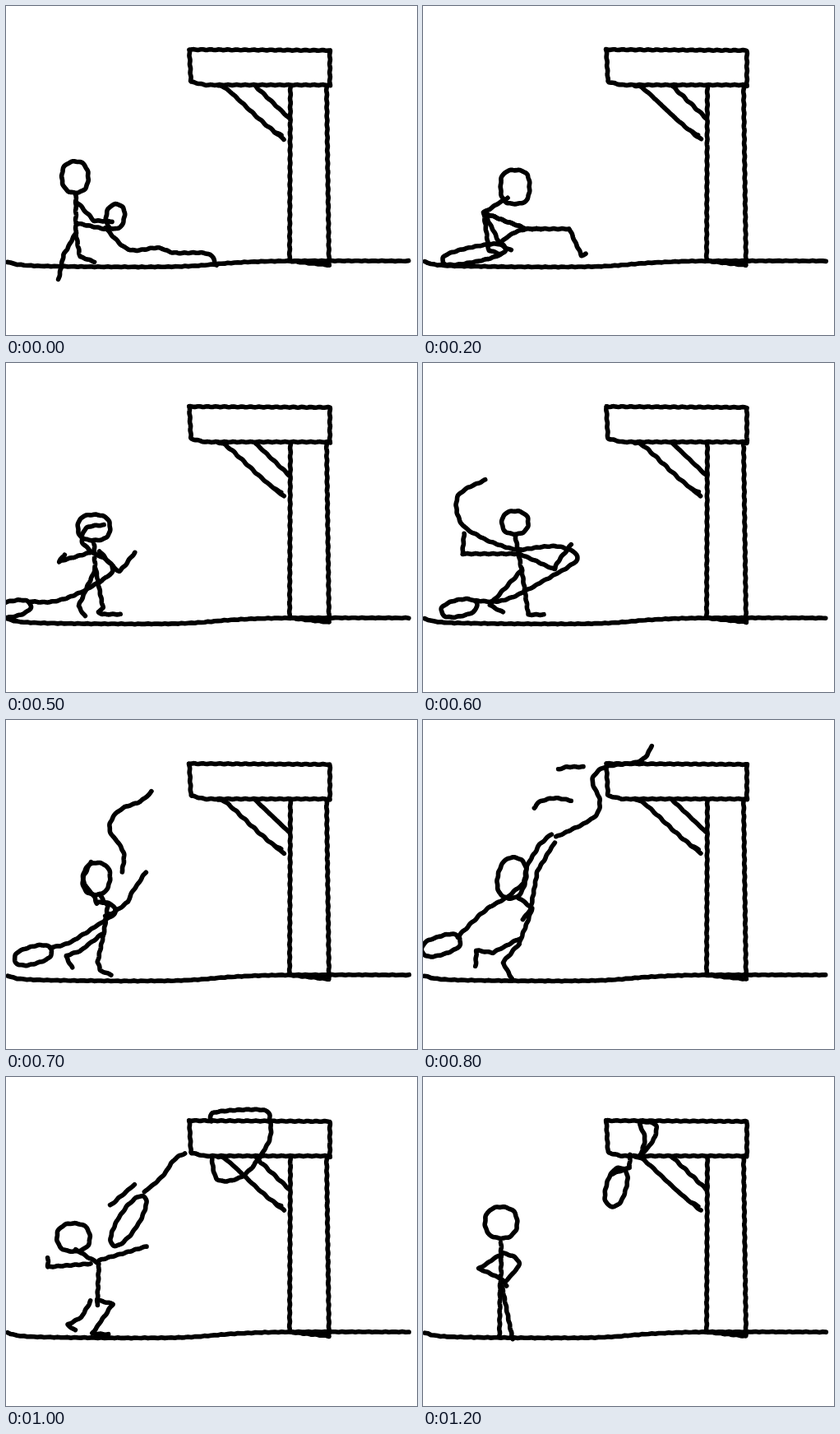
Write an HTML page with a canvas that moves like this. It is 500 px wide and 400 px high and loops after 1300 ms.

```html
<!DOCTYPE html>
<html lang="en">
<head>
<meta charset="utf-8">
<title>Stick figure and rope</title>
<style>
html, body { margin: 0; width: 100%; height: 100%; overflow: hidden; background: #fff; }
canvas { display: block; }
</style>
</head>
<body>
<canvas id="stage" width="500" height="400"></canvas>
<script>
const STEP = 100, STEPS = 13, SAMPLES = 120;
const ctx = document.getElementById('stage').getContext('2d');

const mix = (p, q, k) => p.map((v, i) => v + (q[i] - v) * k);
const dist = (p, q) => Math.hypot(q[0] - p[0], q[1] - p[1]);
const parse = s => s.split(' ').map(p => p.split(',').map(Number));

// Catmull-Rom through the given points
function smooth(pts) {
  const out = [pts[0]];
  for (let i = 0; i < pts.length - 1; i++) {
    const b = pts[i], c = pts[i + 1], a = pts[i - 1] || b, d = pts[i + 2] || c;
    for (let t = 0.125; t <= 1; t += 0.125) {
      out.push(b.map((v, j) => v + t / 2 * (c[j] - a[j]
        + t * (2 * a[j] - 5 * v + 4 * c[j] - d[j]
        + t * (3 * v - a[j] - 3 * c[j] + d[j])))));
    }
  }
  return out;
}

// Evenly spaced points, so that any two paths can be blended
function resample(pts) {
  const lens = pts.slice(1).map((p, i) => dist(pts[i], p));
  const total = lens.reduce((a, b) => a + b, 0);
  const out = [];
  let seg = 0, before = 0;
  for (let i = 0; i <= SAMPLES; i++) {
    const at = total * i / SAMPLES;
    while (seg < lens.length - 1 && before + lens[seg] < at) before += lens[seg++];
    out.push(mix(pts[seg], pts[seg + 1], Math.min(1, (at - before) / lens[seg])));
  }
  return out;
}

const line = s => resample(parse(s));
const curve = s => resample(smooth(parse(s)));

// Closed loop; a power below 1 makes it squarer than an ellipse
function ring(cx, cy, rx, ry, tilt = 0, power = 0.85) {
  const bend = v => Math.sign(v) * Math.abs(v) ** power;
  return Array.from({ length: SAMPLES + 1 }, (_, i) => {
    const a = i / SAMPLES * 2 * Math.PI;
    const x = rx * bend(Math.cos(a)), y = ry * bend(Math.sin(a));
    return [
      cx + x * Math.cos(tilt) - y * Math.sin(tilt),
      cy + x * Math.sin(tilt) + y * Math.cos(tilt)
    ];
  });
}

const scenery = [
  curve('2,311 38,316 200,317 280,312 345,310 490,310'),
  line('223,53 394,54 394,97'),
  line('223,53 225,92 242,96 394,96'),
  line('346,97 345,310 393,315'),
  line('390,97 393,315'),
  curve('258,97 270,102 310,139 338,162'),
  line('327,153 335,157'),
  line('303,97 344,136')
];

// Key poses, two steps apart; parts with the same name blend into each other.
const poses = [
  {
    head: ring(84, 208, 16, 19),
    torso: line('85,228 85,276'),
    armA: line('86,238 107,261 129,262'),
    armB: line('85,264 120,271'),
    legA: line('85,276 70,303 64,332'),
    legB: line('85,276 90,305 108,311'),
    rope: curve('256,315 245,301 205,300 184,294 149,296 122,271'),
    tail: line('122,271 121,270'),
    noose: ring(133, 256, 15, 11, -1.4)
  },
  {
    head: ring(112, 220, 17.5, 20.5, 0, 0.7),
    torso: line('103,233 74,251'),
    armA: line('75,252 126,271 145,271'),
    armB: line('75,252 126,271'),
    legA: line('74,252 80,297 95,302'),
    legB: line('76,254 94,290 107,297'),
    rope: line('198,301 193,304 178,271 130,271'),
    tail: curve('126,271 110,276 95,287'),
    noose: ring(62, 302, 39, 9, -0.2, 0.75)
  },
  {
    head: ring(102, 206, 23, 17, 0, 0.7),
    torso: line('102,223 97,255'),
    armA: line('97,226 77,249 92,259'),
    armB: curve('108,224 109,242 118,257 134,239'),
    legA: line('96,252 95,312'),
    legB: line('98,250 110,304 98,305 131,305'),
    rope: curve('163,252 150,239 120,237 105,241'),
    tail: curve('105,241 84,259 42,289 -5,291'),
    noose: ring(-30, 300, 25, 9, -0.2)
  },
  {
    head: ring(112, 194, 16, 14),
    torso: line('112,209 120,252'),
    armA: line('117,232 48,232 50,207'),
    armB: line('120,233 160,251 163,243 180,221'),
    legA: line('120,252 81,294 97,303'),
    legB: line('120,250 128,306 147,306'),
    rope: curve('76,142 43,161 46,194 75,214 105,225 120,227'),
    tail: curve('120,227 165,223 188,238 150,263 100,288 65,289'),
    noose: ring(44, 298, 22, 10, -0.2)
  },
  {
    head: ring(108, 192, 17, 25, 0.2),
    torso: line('115,215 133,229 117,272'),
    armA: line('104,214 123,198 126,178 142,151 156,139'),
    armB: line('121,243 131,230 139,184 160,149'),
    legA: line('117,266 85,283 65,280 64,299'),
    legB: line('117,272 97,295 108,314'),
    rope: curve('278,32 264,50 222,57 206,73 215,98 207,119 162,142'),
    tail: curve('102,216 75,232 42,264'),
    noose: ring(22, 274, 24, 11, -0.3, 0.75),
    streakA: curve('135,107 143,99 160,95 180,98'),
    streakB: line('165,60 175,57 195,57')
  },
  {
    head: ring(82, 195, 20, 17),
    torso: line('85,210 113,227 111,277'),
    armA: line('103,227 51,231 51,220'),
    armB: line('113,223 171,206'),
    legA: line('103,272 92,292 75,301 84,308'),
    legB: line('111,271 130,276 105,312 125,313'),
    rope: curve('250,54 254,43 312,40 321,52 319,80 290,119 258,125 250,97'),
    tail: curve('218,93 205,100 190,121 168,140'),
    noose: ring(149, 175, 35, 12, -1, 0.95),
    streakA: line('127,156 156,131')
  },
  {
    head: ring(95, 177, 19.5, 19),
    torso: line('95,201 95,250'),
    armA: line('97,214 68,233 95,245 102,254'),
    armB: curve('97,214 113,220 116,230 100,249'),
    legA: line('94,248 93,315'),
    legB: line('96,254 109,319'),
    rope: curve('264,97 270,75 264,56 283,58 280,77 264,96'),
    tail: line('252,94 251,110 230,118'),
    noose: ring(235, 134, 24, 12, -1.3)
  }
];

function figure(step) {
  const a = poses[Math.floor(step / 2)], b = poses[Math.ceil(step / 2)];
  return Object.keys(a).filter(name => b[name]).map(name =>
    a[name].map((p, i) => mix(p, b[name][i], step % 2 / 2)));
}

// Slightly uneven, hand-drawn line that differs at each step
const wobble = ([x, y], step) => [
  x + 0.4 * Math.sin(y * 0.6 + step * 2.4),
  y + 0.4 * Math.sin(x * 0.6 + step * 1.7)
];

function stroke(pts, step) {
  ctx.beginPath();
  pts.forEach(p => ctx.lineTo(...wobble(p, step)));
  ctx.stroke();
}

ctx.lineWidth = 5.6;
ctx.lineCap = ctx.lineJoin = 'round';
ctx.strokeStyle = '#000';
ctx.fillStyle = '#fff';

const start = performance.now();
function draw() {
  const step = Math.floor((performance.now() - start) / STEP) % STEPS;
  ctx.fillRect(0, 0, 500, 400);
  [...scenery, ...figure(step)].forEach(pts => stroke(pts, step));
  requestAnimationFrame(draw);
}
draw();
</script>
</body>
</html>
```
